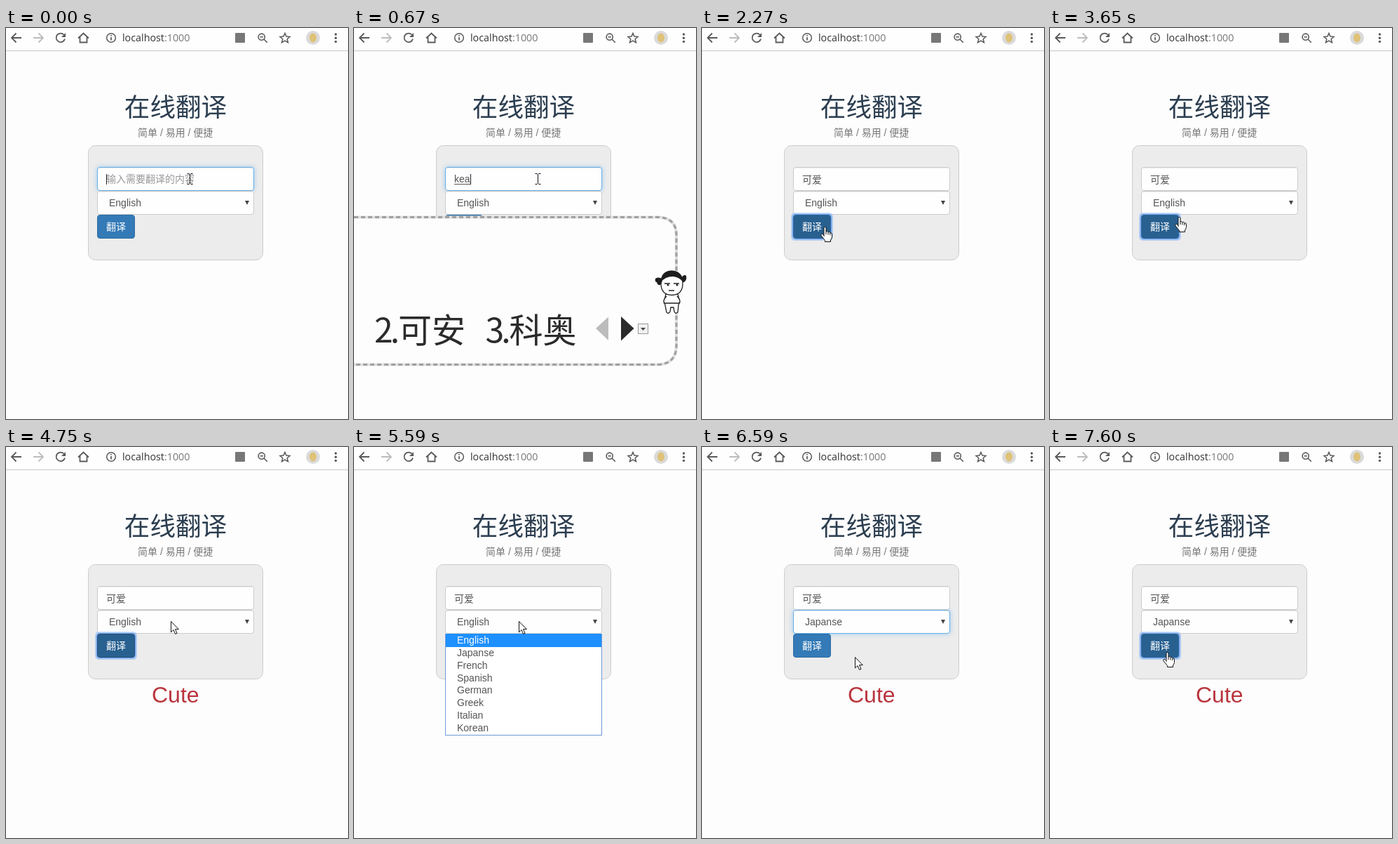
An HTML page for the animation above (8000 ms loop, 488 px wide and 557 px high).

```html
<!DOCTYPE html>
<html lang="zh-CN">
<head>
<meta charset="utf-8">
<title>在线翻译</title>
<style>
  html, body { margin: 0; width: 100%; height: 100%; overflow: hidden; background: #fdfdfd; }
  svg { display: block; }
  text { font: 14px "Liberation Sans", "Noto Sans CJK SC", "Noto Sans CJK", sans-serif; fill: #555; white-space: pre; }
  .han { font-family: "Noto Sans CJK SC", "Noto Sans CJK", sans-serif; }
  .cand { font-size: 48px; fill: #2b2b2b; }
  .url { font: 14.3px "Open Sans", "Noto Sans", sans-serif; fill: #333; }
  .icon { fill: none; stroke: #5a5a5a; stroke-width: 1.8; }
  .field { fill: #fefefe; stroke: #ccc; }
  .field.on { stroke: #66afe9; }
  .glow { fill: #66afe9; opacity: .45; filter: url(#blur); }
  .ring { fill: none; stroke: #6ea6f2; }
  .ink { fill: #fff; stroke: #222; stroke-width: 1.3; }
</style>
</head>
<body>
<svg width="488" height="557" viewBox="0 0 488 557">
  <defs>
    <filter id="blur" x="-10%" y="-60%" width="120%" height="220%"><feGaussianBlur stdDeviation="3"/></filter>
    <path id="frame" d="M-80 269.500H435Q460 271 460 295V454Q459 478 435 479.500H-80"/>
  </defs>

  <!-- browser bar -->
  <rect width="488" height="557" fill="#fdfdfd"/>
  <rect width="488" height="32" fill="#fefefe"/>
  <rect y="32" width="488" height="1" fill="#c8c8c8"/>
  <g class="icon">
    <path d="M22 14H8.500M14.500 7.500L8 14l6.500 6.500"/>
    <path d="M39 14H52.500M46.500 7.500L53 14l-6.500 6.500" stroke="#bdbdbd"/>
    <path d="M82.500 9.500A6.300 6.300 0 1 0 84 15.500"/>
    <path d="M85 7v6h-6z" fill="#5a5a5a" stroke="none"/>
    <path d="M103 14.500L110.500 7.500L118 14.500M105.500 13V20.500H115.500V13"/>
    <circle cx="150" cy="14" r="6.300" stroke-width="1.500"/>
    <path d="M150 13V17.500M150 10V11.600" stroke-width="1.700"/>
    <circle cx="364.700" cy="12.700" r="4.600" stroke-width="1.600"/>
    <path d="M368 16l4.800 4.800M362.500 12.700h4.400" stroke-width="1.600"/>
    <path d="M398 7.500l2 4.600 5 .4-3.800 3.300 1.200 4.900-4.400-2.600-4.400 2.600 1.200-4.900-3.800-3.300 5-.4z" stroke-width="1.500"/>
  </g>
  <rect x="327" y="7" width="14" height="14" rx="1" fill="#777"/>
  <circle cx="438" cy="14" r="10" fill="#dadada"/>
  <ellipse cx="438" cy="14" rx="5" ry="6.500" fill="#dfc277"/>
  <g fill="#5a5a5a"><circle cx="470.500" cy="9" r="1.700"/><circle cx="470.500" cy="14.200" r="1.700"/><circle cx="470.500" cy="19.400" r="1.700"/></g>
  <text class="url" x="166" y="19">localhost<tspan fill="#777">:1000</tspan></text>

  <!-- page -->
  <text class="han" x="168.800" y="126" style="font-size:36.600px;fill:#2c3e50">在线翻译</text>
  <text x="188" y="154" style="fill:#777">简单 / 易用 / 便捷</text>
  <rect x="117.500" y="167.500" width="249" height="163" rx="10" fill="#ececec" stroke="#ccc"/>
  <text id="result" x="208" y="363.500" style="font-size:32px;fill:#b9343d">Cute</text>
  <rect id="inputGlow" class="glow" x="129" y="197" width="226" height="36" rx="5"/>
  <rect id="selectGlow" class="glow" x="129" y="231" width="226" height="36" rx="5"/>
  <rect id="input" class="field" x="130.500" y="198.500" width="223" height="33" rx="3.500"/>
  <path d="M133 199.500H351" stroke="#000" opacity=".07"/>
  <rect id="select" class="field" x="130.500" y="232.500" width="223" height="33" rx="3.500"/>
  <path d="M133 233.500H351" stroke="#000" opacity=".07"/>
  <text id="value" x="143" y="220"></text>
  <path id="underline" stroke="#555"/>
  <rect id="caret" y="208" width="1" height="15" fill="#222"/>
  <text id="lang" x="147" y="254"></text>
  <path d="M341 246h6l-3 6z" fill="#444"/>
  <rect id="button" x="130.500" y="266.500" width="53" height="33" rx="3.500"/>
  <g id="ring" class="ring">
    <rect x="128.500" y="264.500" width="57" height="37" rx="4" stroke-width="3" opacity=".4"/>
    <rect x="129.500" y="265.500" width="55" height="35" rx="4" stroke-width="1.600"/>
  </g>
  <text x="143" y="288" style="fill:#fff">翻译</text>

  <g id="menu">
    <rect x="130.500" y="266.500" width="223" height="144" fill="#fff" stroke="#6f9bd8"/>
    <rect id="mark" x="131" width="222" fill="#1e90ff"/>
  </g>

  <!-- input method window -->
  <g id="ime">
    <use href="#frame" fill="#fdfdfd" stroke="#e0e0e0" stroke-width="4"/>
    <use href="#frame" fill="none" stroke="#a0a0a0" stroke-width="3.200" stroke-dasharray="6 4"/>
    <g id="cands"></g>
    <path d="M363 411.500V445L345 428z" fill="#bcbcbc"/>
    <path d="M381 411V445.500L399.500 428z" fill="#2b2b2b"/>
    <rect x="405.500" y="421.500" width="14" height="14" fill="#f1f1f1" stroke="#999"/>
    <path d="M409 427h7l-3.500 4z" fill="#444"/>
    <g id="doodle">
      <path class="ink" d="M445 379Q442 390 444 395L446 405Q449 408 451 404L452 398H456L457 404Q459 408 462 405L463 395Q465 388 462 379z"/>
      <path class="ink" d="M444 392H463M446 382Q440 388 443 393M461 382Q467 388 464 393" fill="none"/>
      <path class="ink" d="M438 364Q438 347 453 346.500Q469 347 469 364Q469 380 453.500 380.500Q438 380 438 364z"/>
      <path d="M438 362Q439 346 453 345.500Q468 346 469 361Q464 355 455 354Q444 354 438 362z" fill="#1d1d1d"/>
      <path d="M440 357Q433 354 430 357Q429 362 432 362Q433 367 437 366Q440 363 440 357zM467 356Q471 350 474 353Q475 359 472 361Q470 364 468 360z" fill="#1d1d1d"/>
      <path d="M443 364h8M456 364h8M449 374h8" fill="none" stroke="#222" stroke-width="1.300"/>
      <circle cx="448" cy="366" r="1.500" fill="#222"/><circle cx="461" cy="366" r="1.500" fill="#222"/>
    </g>
  </g>

  <!-- pointers -->
  <g id="beam"><path d="M-4 -7.500H-1M1 -7.500H4M0 -7V7M-4 7.500H-1M1 7.500H4" transform="translate(.5 0)" fill="none" stroke="#111"/></g>
  <g id="arrow"><path d="M.5 .5V15.800L4 12.500L6.600 18.400L9 17.300L6.500 11.600H11.300z" fill="#fff" stroke="#111"/></g>
  <g id="hand"><path d="M5 14V2Q5 .5 6.500 .5Q8 .5 8 2V7Q10.500 5.800 11 7.700Q13.300 6.800 13.800 8.700Q16.500 8.200 16.500 11V14.500Q16.300 17 14.500 19V21.500H6.500V19.500L1 12.800Q.2 10.500 2.200 10.200Q3.500 10.500 5 12.500" fill="#fff" stroke="#111" stroke-linejoin="round"/><path d="M8 7V11M11 8V11.500M13.800 9V12" stroke="#111"/></g>
</svg>
<script>
const LOOP = 8000;
const NS = 'http://www.w3.org/2000/svg';
const ui = {};
document.querySelectorAll('[id]').forEach(e => ui[e.id] = e);

const langs = ['English', 'Japanse', 'French', 'Spanish', 'German', 'Greek', 'Italian', 'Korean'];
const ROW = 17.86;

function addText(parent, str, x, y, cls = '') {
  const el = document.createElementNS(NS, 'text');
  el.setAttribute('x', x);
  el.setAttribute('y', y);
  el.setAttribute('class', cls);
  el.textContent = str;
  parent.append(el);
  return el;
}
const items = langs.map((name, i) => addText(ui.menu, name, 147, 280 + i * ROW));

const start = {
  value: '', pinyin: false, caret: 143, lang: 0, focus: 'input', hover: false,
  menu: false, pick: 0, result: false, ime: '', shift: 0, sway: 0, cursor: ['beam', 262, 215]
};

// Each step changes part of the state and holds until the next one.
const steps = [
  [250, { value: 'k', pinyin: true, caret: 150, ime: '2.看 3.快 4.开', sway: 0 }],
  [370, { value: 'ke', caret: 158, ime: '2.颗 3.科 4.课', sway: 3 }],
  [520, { sway: 0 }],
  [670, { value: 'kea', caret: 166, ime: '1.可爱 2.可安 3.科奥' }],
  [790, { value: 'keai', caret: 169, ime: '1.可爱 2.可哀 3.可', shift: -51 }],
  [910, { sway: -1 }],
  [1060, { value: '可爱', pinyin: false, caret: 171, ime: '' }],
  [1330, { caret: 0 }],
  [1600, { cursor: ['beam', 247, 226] }],
  [1720, { caret: 171, cursor: ['arrow', 227, 252] }],
  [1870, { cursor: ['arrow', 200, 267] }],
  [1990, { hover: true, cursor: ['hand', 172, 284] }],
  [2110, { caret: 0, focus: 'input button', cursor: ['hand', 169, 283] }],
  [2270, { focus: 'button' }],
  [3410, { cursor: ['hand', 171, 279] }],
  [3530, { cursor: ['hand', 175, 273] }],
  [3650, { cursor: ['hand', 178, 269] }],
  [3800, { hover: false, result: true, cursor: ['arrow', 197, 261] }],
  [3930, { cursor: ['arrow', 205, 259] }],
  [4080, { cursor: ['arrow', 210, 259] }],
  [4360, { cursor: ['arrow', 213, 271] }],
  [4510, { cursor: ['arrow', 219, 264] }],
  [4630, { cursor: ['arrow', 229, 253] }],
  [4750, { cursor: ['arrow', 235, 248] }],
  [5590, { menu: true, focus: '' }],
  [5740, { focus: 'select' }],
  [5890, { cursor: ['arrow', 231, 266] }],
  [6010, { pick: 1, cursor: ['arrow', 223, 287] }],
  [6130, { cursor: ['arrow', 218, 299] }],
  [6590, { menu: false, lang: 1 }],
  [6900, { cursor: ['arrow', 210, 299] }],
  [7050, { cursor: ['arrow', 189, 298] }],
  [7200, { hover: true, cursor: ['hand', 168, 295] }],
  [7320, { cursor: ['hand', 162, 293] }],
  [7440, { focus: 'select button', cursor: ['hand', 161, 292] }],
  [7600, { focus: 'button' }]
];

const show = (el, on) => el.style.display = on ? '' : 'none';
const move = (el, x, y) => el.setAttribute('transform', `translate(${x} ${y})`);

// Candidates are laid out leftwards from the paging arrows.
function layCands(list) {
  ui.cands.replaceChildren();
  let right = 317.5;
  for (const item of list.split(' ').reverse()) {
    const [num, word] = item.split('.');
    const x = right - 34 - 48 * word.length;
    addText(ui.cands, num + '.', x, 448, 'han cand').style.letterSpacing = '-4px';
    addText(ui.cands, word, x + 34, 448, 'han cand');
    right = x - 28.5;
  }
}

function render(s) {
  const has = name => s.focus.includes(name);
  for (const name of ['input', 'select']) {
    ui[name].classList.toggle('on', has(name));
    show(ui[name + 'Glow'], has(name));
  }
  ui.value.textContent = s.value || '输入需要翻译的内容';
  ui.value.style.fill = s.value ? '#555' : '#999';
  ui.value.setAttribute('y', s.value === '可爱' ? 221 : 220);
  show(ui.underline, s.pinyin);
  ui.underline.setAttribute('d', `M143 222.5H${s.caret}`);
  show(ui.caret, s.caret);
  ui.caret.setAttribute('x', s.caret);
  ui.lang.textContent = langs[s.lang];

  const active = s.hover || has('button');
  ui.button.setAttribute('fill', active ? '#286090' : '#337ab7');
  ui.button.setAttribute('stroke', s.hover ? '#204d74' : active ? '#122b40' : '#2e6da4');
  show(ui.ring, has('button'));
  show(ui.result, s.result);

  show(ui.menu, s.menu);
  ui.mark.setAttribute('y', s.pick ? 267 + s.pick * ROW : 266);
  ui.mark.setAttribute('height', s.pick ? 18 : 19);
  items.forEach((el, i) => el.style.fill = i === s.pick ? '#fff' : '#555');

  show(ui.ime, s.ime);
  if (s.ime) layCands(s.ime);
  move(ui.ime, s.shift, 0);
  move(ui.doodle, s.sway, 0);

  const [kind, x, y] = s.cursor;
  for (const name of ['beam', 'arrow', 'hand']) show(ui[name], name === kind);
  move(ui[kind], x, y);
}

let last = -1;
function tick() {
  const t = performance.now() % LOOP;
  const past = steps.filter(([at]) => at <= t);
  if (past.length !== last) {
    last = past.length;
    render(Object.assign({}, start, ...past.map(step => step[1])));
  }
  requestAnimationFrame(tick);
}
tick();
</script>
</body>
</html>
```
